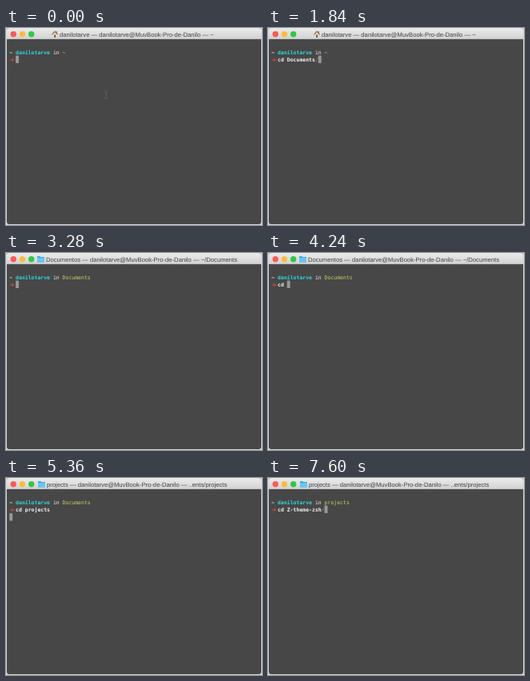
An HTML page with a canvas for the animation above (8000 ms loop, 320 by 247 pixels).

```html
<!DOCTYPE html>
<html lang="pt">
<head>
<meta charset="utf-8">
<title>Terminal</title>
<style>
html, body { margin: 0; width: 100%; height: 100%; overflow: hidden; background: #fff; }
canvas { display: block; width: 320px; height: 247px; }
</style>
</head>
<body>
<canvas id="stage"></canvas>
<script>
const W = 320, H = 247, LOOP = 8000;
const USER = 'danilotarve', HOST = USER + '@MuvBook-Pro-de-Danilo';
const CELL = 3.9, ROW = 9.6, LEFT = 4.3, TOP = 25;
const MONO = '"DejaVu Sans Mono", "Liberation Mono", monospace';
const SANS = '"Liberation Sans", Arial, sans-serif';
const COLORS = {
  body: '#474747', white: '#f4f4f4', cyan: '#2fd6dc', yellow: '#cdd35c',
  red: '#c8473f', cursor: '#989898', dim: '#8d8d8d'
};

const canvas = document.getElementById('stage');
const ctx = canvas.getContext('2d');
const dpr = window.devicePixelRatio || 1;
canvas.width = W * dpr;
canvas.height = H * dpr;

const titles = {
  home: { icon: 57, x: 67, text: `${USER} — ${HOST} — ~` },
  docs: { icon: 39, x: 50, text: `Documentos — ${HOST} — ~/Documents` },
  proj: { icon: 40, x: 51, text: `projects — ${HOST} — ..ents/projects` }
};

// phase: type at the first prompt, run the command, show the next prompt
const steps = [
  { t: 0, title: 'home', dir: '~', cmd: '', mouse: true },
  { t: 320, cmd: 'cd', mouse: false },
  { t: 480, cmd: 'cd ' },
  { t: 720, cmd: 'cd D' },
  { t: 1040, cmd: 'cd Do' },
  { t: 1440, cmd: 'cd Doc' },
  { t: 1840, cmd: 'cd Documents/' },
  { t: 2480, cmd: 'cd Documents', phase: 'run', title: 'docs' },
  { t: 2560, phase: 'done', next: 'Documents' },
  { t: 3280, phase: 'type', dir: 'Documents', cmd: '' },
  { t: 4000, cmd: 'c' },
  { t: 4080, cmd: 'cd' },
  { t: 4240, cmd: 'cd ' },
  { t: 4480, cmd: 'cd p' },
  { t: 4560, cmd: 'cd pr' },
  { t: 4720, cmd: 'cd pro' },
  { t: 4880, cmd: 'cd projects/' },
  { t: 5360, cmd: 'cd projects', phase: 'run', title: 'proj' },
  { t: 5440, phase: 'done', next: 'projects' },
  { t: 6240, phase: 'type', dir: 'projects', cmd: '' },
  { t: 6800, cmd: 'c' },
  { t: 6880, cmd: 'cd' },
  { t: 7040, cmd: 'cd ' },
  { t: 7280, cmd: 'cd Z' },
  { t: 7600, cmd: 'cd Z-theme-zsh/' }
];

function stateAt(t) {
  return Object.assign({ phase: 'type' }, ...steps.filter(s => s.t <= t));
}

function shape(color, points) {
  ctx.fillStyle = color;
  ctx.beginPath();
  points.forEach(([x, y]) => ctx.lineTo(x, y));
  ctx.closePath();
  ctx.fill();
}

function rect(color, x, y, w, h) {
  ctx.fillStyle = color;
  ctx.fillRect(x, y, w, h);
}

function put(text, col, row, color, bold) {
  ctx.font = `${bold ? 'bold ' : ''}6.48px ${MONO}`;
  ctx.fillStyle = color;
  [...text].forEach((ch, i) =>
    ctx.fillText(ch, LEFT + (col + i) * CELL, TOP + row * ROW + 7.7));
}

function cursor(col, row) {
  rect(COLORS.cursor, LEFT + col * CELL, TOP + row * ROW, CELL, ROW - 0.2);
}

function prompt(row, dir) {
  put('~', 0, row, COLORS.white, true);
  put(USER, 2, row, COLORS.cyan, true);
  put('in', 14, row, COLORS.white);
  put(dir, 17, row, COLORS.yellow);
  const y = TOP + (row + 1) * ROW + 5.4;
  shape(COLORS.red, [[5, y - 0.6], [7.6, y - 0.6], [7.3, y - 2.3],
    [10.4, y], [7.3, y + 2.3], [7.6, y + 0.6], [5, y + 0.6]]);
}

function homeIcon(x) {
  rect('#e6dcc8', x + 1.4, 7, 5.4, 5);
  rect('#7d5a3c', x + 3.2, 8.4, 1.9, 3.6);
  rect('#8a5236', x + 5.7, 4, 1, 2.5);
  shape('#8a6248', [[x, 8], [x + 4.1, 3.6], [x + 8.2, 8], [x + 7.2, 8.5],
    [x + 4.1, 5.3], [x + 1, 8.5]]);
}

function folderIcon(x) {
  shape('#3fa9dd', [[x, 4], [x + 3.4, 4], [x + 4.2, 5], [x + 9, 5], [x + 9, 11.6], [x, 11.6]]);
  rect('#69c6f2', x, 6, 9, 5.6);
}

function titleBar(name) {
  const grad = ctx.createLinearGradient(0, 0, 0, 14);
  grad.addColorStop(0, '#ebebeb');
  grad.addColorStop(1, '#d2d2d2');
  rect(grad, 0, 0, W, 14);
  rect('#b4b4b4', 0, 13.5, W, 0.6);
  ['#fc5b57', '#fdbb3f', '#33c748'].forEach((color, i) => {
    ctx.fillStyle = color;
    ctx.beginPath();
    ctx.arc(9.3 + i * 11.2, 7.7, 3.7, 0, Math.PI * 2);
    ctx.fill();
  });
  const { icon, x, text } = titles[name];
  (name === 'home' ? homeIcon : folderIcon)(icon);
  ctx.font = `7.66px ${SANS}`;
  ctx.fillStyle = '#404040';
  ctx.fillText(text, x, 10.7);
}

function mouse(x, y) {
  const beam = (color, width) => {
    ctx.strokeStyle = color;
    ctx.lineWidth = width;
    ctx.beginPath();
    ctx.moveTo(x - 2, y - 4.5);
    ctx.quadraticCurveTo(x, y - 4.5, x, y - 3);
    ctx.lineTo(x, y + 3);
    ctx.quadraticCurveTo(x, y + 4.5, x - 2, y + 4.5);
    ctx.moveTo(x + 2, y - 4.5);
    ctx.quadraticCurveTo(x, y - 4.5, x, y - 3);
    ctx.moveTo(x, y + 3);
    ctx.quadraticCurveTo(x, y + 4.5, x + 2, y + 4.5);
    ctx.stroke();
  };
  beam('#858585', 1.6);
  beam('#222', 0.8);
}

function draw(t) {
  const s = stateAt(t);
  ctx.setTransform(dpr, 0, 0, dpr, 0, 0);
  ctx.textRendering = 'geometricPrecision';
  rect('#d8d8d8', 0, 0, W, H);
  ctx.save();
  ctx.beginPath();
  ctx.roundRect(1, 0, W - 2, H - 1, 3);
  ctx.clip();
  rect(COLORS.body, 0, 0, W, H);
  titleBar(s.title);

  prompt(0, s.dir);
  const slash = s.cmd.endsWith('/');
  put(slash ? s.cmd.slice(0, -1) : s.cmd, 2, 1, COLORS.white, true);
  if (slash) put('/', 1 + s.cmd.length, 1, COLORS.dim);

  if (s.phase === 'type') cursor(2 + s.cmd.length, 1);
  else if (s.phase === 'run') cursor(0, 2);
  else {
    prompt(3, s.next);
    cursor(2, 4);
  }
  if (s.mouse) mouse(125, 83);
  ctx.restore();
}

function tick() {
  draw(performance.now() % LOOP);
  requestAnimationFrame(tick);
}
tick();
</script>
</body>
</html>
```
